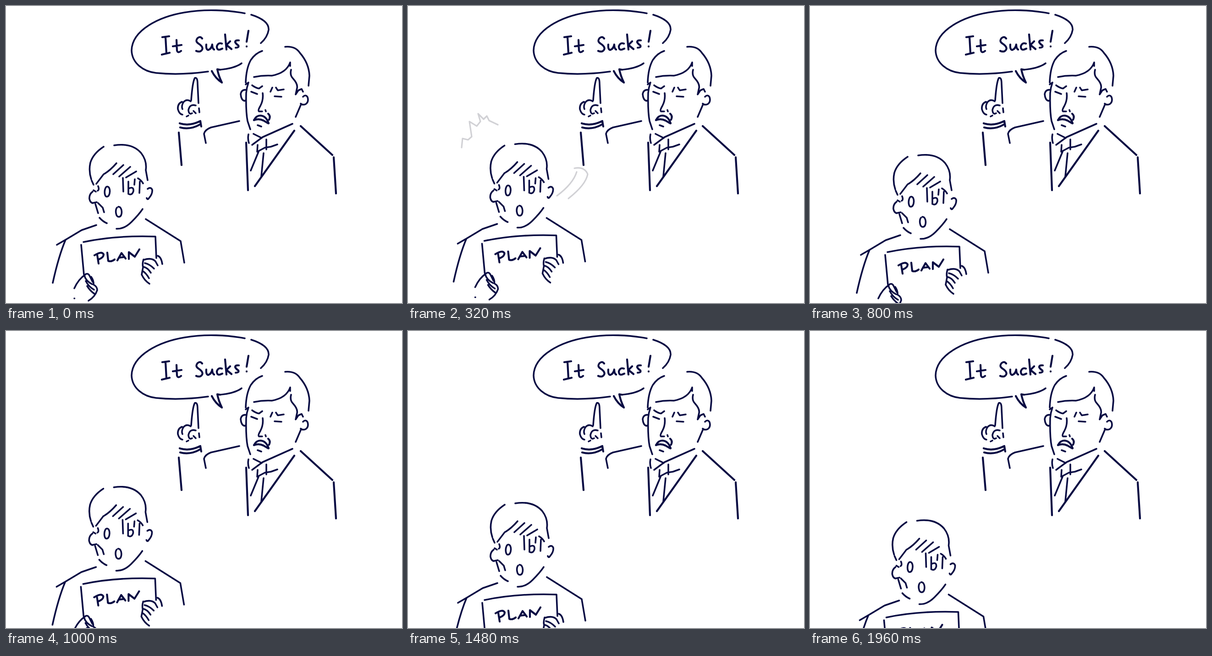
Write an HTML page that moves like this. It is 864 by 648 pixels and loops after 2000 ms.

```html
<!DOCTYPE html>
<html lang="en">
<head>
<meta charset="utf-8">
<title>Plan rejected</title>
<style>
html, body { margin: 0; width: 100%; height: 100%; overflow: hidden; background: #fff; }
svg { display: block; width: 100vw; height: 100vh; }
path { fill: none; stroke: #080b43; stroke-width: 3.6; stroke-linecap: round; stroke-linejoin: round; }
.bold { stroke-width: 4.2; }
.mark path { stroke: #3c3c4c; stroke-width: 3.2; }
</style>
</head>
<body>
<svg viewBox="0 0 864 648" role="img" aria-label="A boss says: It Sucks! A man holding a plan sinks away.">
  <!-- speech bubble -->
  <path d="M521 16C485 9 435 6 390 14C335 23 275 52 274 97C275 125 300 143 327 146C365 150 405 148 441 143
    M535 19C560 27 574 38 573 52C571 65 564 74 556 81M467 139Q499 136 514 125"/>
  <path class="bold" d="M449 142Q457 158 471 167Q464 153 461 138L467 139"/>
  <!-- lettering -->
  <path class="bold" d="M341 68L356 66M348 67L350 103M340 106L357 102
    M372 74L373 97Q375 104 382 98M364 88L383 85
    M428 71Q424 65 418 70Q412 77 420 82Q431 89 428 95Q424 102 415 98
    M437 84Q436 95 441 96Q448 94 450 84Q450 93 454 95
    M471 82Q463 79 460 88Q460 97 467 95L472 93
    M478 62L481 95M489 77L481 85L492 94
    M508 75Q500 74 500 79Q502 83 507 86Q509 91 501 91
    M529 54L525 78M525 88L525 88.5"/>
  <!-- boss: hair and head -->
  <path d="M559 98Q544 103 534 118Q524 136 523 167M609 89Q631 87 641 102Q661 125 662 152L660 174
    M541 155Q560 151 580 152Q612 146 620 123L620 131M622 139Q619 151 626 158Q637 170 635 179L632 193L638 184L645 181L648 187
    M648 198Q654 192 658 199Q661 209 654 214Q648 217 643 213M644 214L632 242
    M523 183Q514 182 512 192Q513 205 520 207L523 206M523 171L529 167Q525 178 524 190Q523 230 527 251L533 269"/>
  <!-- boss: face -->
  <path d="M537 173Q545 179 552 180L559 175M535 187L548 192M560 190Q562 205 555 218Q549 228 552 230L559 230M566 227L567 230
    M581 178L577 187M589 178L593 184L606 182M586 197L601 198M549 260L557 263"/>
  <path class="bold" d="M541 249Q546 239 555 239Q568 240 573 256M541 249Q552 245 562 250L572 256M572 235Q578 240 574 248"/>
  <!-- boss: suit -->
  <path d="M529 280Q527 290 530 299M537 303L560 286L625 257M540 279L558 288
    M549 303L548 318L565 309L578 307L592 302M568 291L568 313M551 318L534 359M562 321L557 372
    M509 251L447 265Q434 270 432 279L436 299"/>
  <path class="bold" d="M524 298L528 402M629 272L543 393M643 262L712 325M715 330L720 409M377 276L383 347"/>
  <!-- boss: raised hand -->
  <path d="M404 206Q407 165 412 157Q418 155 418 170L420 212M384 209Q374 213 375 225Q378 236 385 237
    M403 208Q394 202 387 210Q382 219 385 225M414 217Q401 213 398 227Q399 238 406 234M409 229L414 234M421 223L422 232M394 241L398 239"/>
  <path class="bold" d="M379 256Q400 263 424 251L426 263M380 265Q402 271 424 258"/>

  <g id="man">
    <!-- hair -->
    <path d="M213 307Q190 322 184 342Q180 360 186 378M236 304Q275 298 295 321Q308 338 305 358L309 380"/>
    <path d="M241 343Q228 358 215 366M213 367L197 388M256 347L234 367M271 351L247 372M284 361L262 374"/>
    <!-- face -->
    <path d="M255 375L256 405M267 383L267 410M268 398Q279 393 278 404Q275 414 267 410M281 378L280 390M288 376Q295 380 299 387M292 383L291 408
      M309 399Q316 394 319 401Q320 410 312 419Q309 424 307 419
      M221 394C229 394 228 416 220 416C213 416 214 394 221 394M245 438C254 437 255 459 247 460C239 461 238 445 242 440"/>
    <path d="M187 381L191 390M191 402L196 405M201 393Q204 401 200 403M189 405Q181 411 182 421Q184 430 190 430
      M188 430L198 428M195 432L201 452M201 430L211 440L214 450M204 462Q211 470 220 474M241 486Q258 487 274 471Q290 455 298 443"/>
    <!-- body and sheet -->
    <path d="M197 478L165 489L130 510L111 521M130 510Q115 545 102 604M305 465L381 513L389 560"/>
    <path d="M169 515Q240 500 326 503L328 550M164 521L170 586"/>
    <path class="bold" d="M199 543L202 562M193 544Q209 534 213 542Q213 549 202 553
      M221 538L223 556Q229 559 237 553M243 555L252 539L261 551M247 549L256 548M268 552L268 537L281 547L291 531"/>
    <!-- hands -->
    <path d="M173 586Q158 596 149 616M149 638L149.5 638M171 587Q178 581 182 588L189 602
      M186 591Q192 600 191 608Q199 612 199 620Q194 635 180 643
      M171 588Q174 600 188 607M174 600Q180 612 192 619M177 611Q183 621 193 628"/>
    <path d="M331 545Q339 548 341 563M300 554Q318 548 326 557L331 566M300 553Q297 563 299 570L296 586
      M303 561Q313 563 323 573M300 569Q309 571 316 582M298 578Q306 583 312 594M296 586Q302 599 313 606"/>
  </g>

  <g class="mark" id="jag"><path d="M117 309L119 289L131 292L139 285L134 252L150 262L158 252L153 235L165 247L172 240L177 250L196 259"/></g>
  <g class="mark" id="swoosh"><path d="M325 414Q360 388 368 362M363 354Q385 350 392 367Q388 390 350 420"/></g>
</svg>
<script>
const LOOP = 2000, STEP = 40;
const [man, jag, swoosh] = ["man", "jag", "swoosh"].map(id => document.getElementById(id));

// time, x, y: a start, then a trembling descent
const POSES = [
  [0, 0, 0], [320, -2.5, -2.5], [560, 0, 1], [800, 0, 22], [1120, -1, 46],
  [1160, -1, 50], [1480, -2, 72], [1680, -2, 89], [1960, -2.5, 110]
];

function poseAt(t) {
  const i = Math.max(1, POSES.findIndex(p => p[0] >= t));
  const a = POSES[i - 1], b = POSES[i];
  const k = (t - a[0]) / (b[0] - a[0]);
  return [1, 2].map(n => a[n] + (b[n] - a[n]) * k);
}

const move = (el, x, y) => el.setAttribute("transform", `translate(${x} ${y})`);

function drawMarks(t) {
  const k = (t - 40) / 440;
  const opacity = k >= 0 && k < 1 ? 0.65 * (1 - k) : 0;
  const drift = k ** 3 - 0.257;
  jag.setAttribute("opacity", opacity);
  swoosh.setAttribute("opacity", opacity);
  move(jag, -22 * drift, -6 * drift);
  move(swoosh, 45 * drift, -20 * drift);
}

function render(now) {
  const t = Math.floor((now % LOOP) / STEP) * STEP;
  move(man, ...poseAt(t));
  drawMarks(t);
}

const start = performance.now();
function tick() {
  render(performance.now() - start);
  requestAnimationFrame(tick);
}
tick();
</script>
</body>
</html>
```
